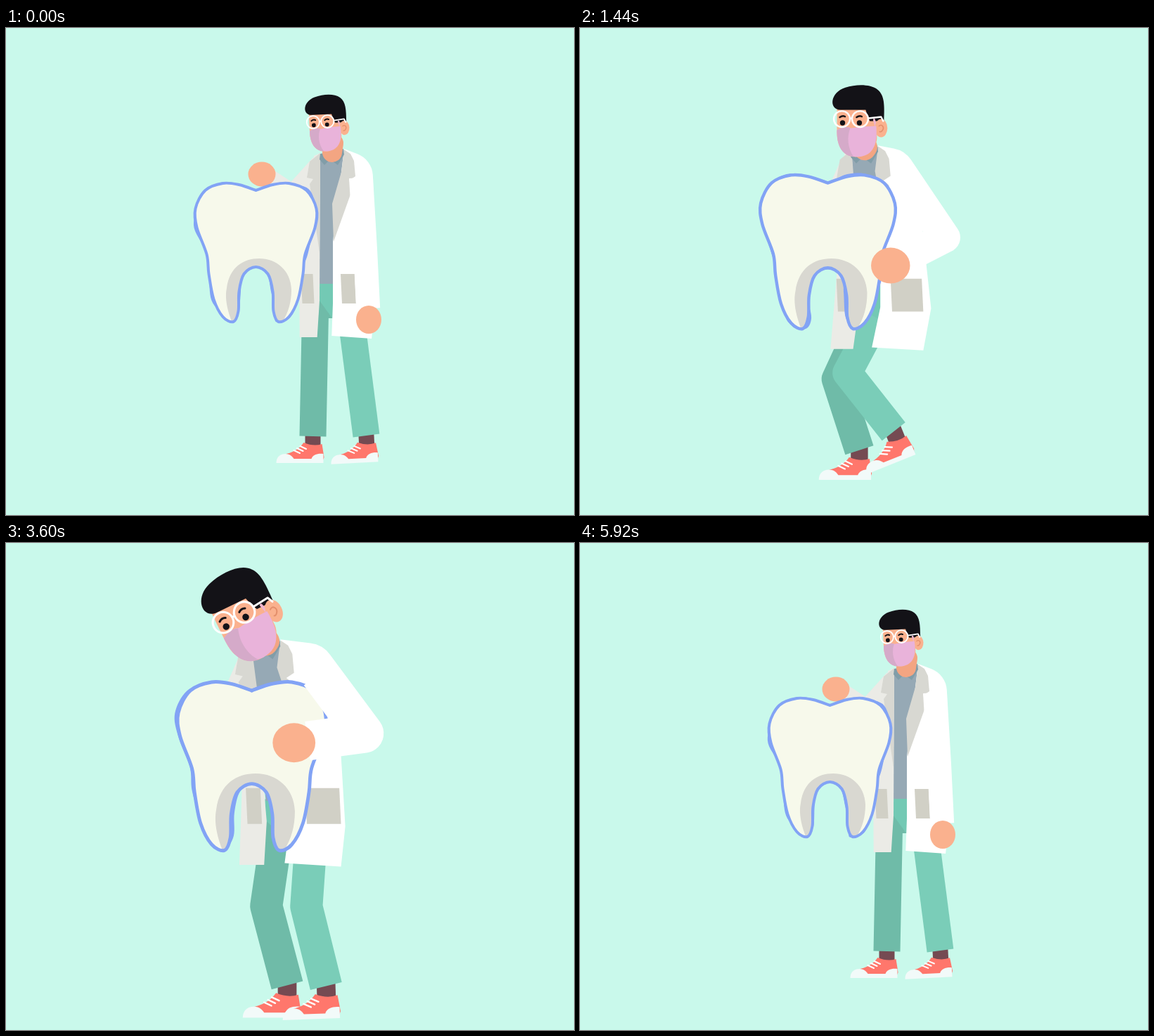
Write an HTML page with a canvas that moves like this. It is 808 px wide and 693 px high and loops after 6 s.

```html
<!DOCTYPE html>
<html lang="en">
<head>
<meta charset="utf-8">
<title>Dentist hugging a tooth</title>
<style>
html, body { margin: 0; width: 100%; height: 100%; overflow: hidden; background: #c9f9eb; }
canvas { display: block; }
</style>
</head>
<body>
<canvas id="stage" width="808" height="693"></canvas>
<script>
const ctx = document.getElementById('stage').getContext('2d');
const LOOP = 6000, STEP = 80, ZOOM_X = 383, ZOOM_Y = 328;
const BG = '#c9f9eb', SKIN = '#fab18e', WHITE = '#fff', BLACK = '#131217', BLUE = '#82a3f5';
const PALE = '#ebebe6', GREY = '#d8d8d2', POCKET = '#d1d0c6', DARK_GREEN = '#6fbba8';
const THIGH = 80, CALF = 96;

// Joints of the figure; near = size towards the viewer, turn and spread = how the coat opens
const stand = {
  neck: [464, 180], waist: [455, 364], hem: [453, 440],
  shoulder: [505, 213], elbow: [511, 315], hand: [516, 415], farHand: [364, 208],
  hipL: [440, 405], ankleL: [436.5, 581], hipR: [490, 405], ankleR: [512.5, 580],
  foot: -3, tilt: -3, near: 0, turn: 0, spread: 0, zoom: 1
};
const step = { ...stand,
  neck: [453, 180], waist: [451, 364], hem: [433, 440],
  shoulder: [496, 215], elbow: [505, 315], hand: [511, 410], farHand: [380, 262],
  hipL: [433, 405], ankleL: [398.5, 575], hipR: [487, 407], spread: 1, zoom: 1.003
};
const crouch = { ...step,
  neck: [403, 191], waist: [405, 362], hem: [400, 444],
  shoulder: [452, 221], elbow: [506, 301], hand: [436, 337],
  hipL: [400, 410], ankleL: [396, 574], hipR: [418, 404], ankleR: [440, 550],
  foot: -22, tilt: 0, near: .41, turn: 1, zoom: 1.109
};
const hug = { ...crouch,
  neck: [372, 179], waist: [382, 360], hem: [382, 435],
  shoulder: [435, 211], elbow: [487, 281], hand: [405, 292],
  hipL: [384, 404], ankleL: [397, 576], hipR: [425, 404], ankleR: [442.5, 577],
  foot: -2, tilt: -9.5, near: 1, zoom: 1.2
};
const hold = { ...hug, zoom: 1.215 };
const nod = { ...hold, tilt: -26 };
const back = { ...crouch, hand: [425, 323], foot: -39, tilt: -20, near: .6, zoom: 1.14 };
const KEYS = [[0, stand], [720, step], [1440, crouch], [2080, hug], [2500, hold], [3250, nod],
  [3850, nod], [4400, back], [5000, step], [5560, stand], [LOOP, stand]];

// Monotone cubic through the keys
function curve(get, t) {
  let i = 0;
  while (i < KEYS.length - 2 && t >= KEYS[i + 1][0]) i++;
  const val = k => get(KEYS[k][1]), span = k => KEYS[k + 1][0] - KEYS[k][0];
  const slope = k => (val(k + 1) - val(k)) / span(k);
  const tangent = k => {
    if (k === 0 || k === KEYS.length - 1) return 0;
    const a = slope(k - 1), b = slope(k);
    return a * b > 0 ? 2 * a * b / (a + b) : 0;
  };
  const u = (t - KEYS[i][0]) / span(i), v = 1 - u;
  return val(i) * v * v * (1 + 2 * u) + val(i + 1) * u * u * (3 - 2 * u)
    + span(i) * u * v * (v * tangent(i) - u * tangent(i + 1));
}
function poseAt(t) {
  const pose = {};
  for (const key in stand) {
    pose[key] = Array.isArray(stand[key])
      ? [0, 1].map(k => curve(p => p[key][k], t))
      : curve(p => p[key], t);
  }
  return pose;
}

const add = ([x, y], dx, dy) => [x + dx, y + dy];
// Several points given as offsets from one joint
function around(joint, ...offsets) {
  const points = [];
  for (let i = 0; i < offsets.length; i += 2) points.push(add(joint, offsets[i], offsets[i + 1]));
  return points;
}
// Point at a distance from a towards b, moved sideways by off
function toward(a, b, dist, off = 0) {
  const dx = b[0] - a[0], dy = b[1] - a[1], len = Math.hypot(dx, dy);
  return add(a, (dx * dist + dy * off) / len, (dy * dist - dx * off) / len);
}
function knee(hip, ankle) {
  const d = Math.hypot(ankle[0] - hip[0], ankle[1] - hip[1]);
  const along = (d * d + THIGH ** 2 - CALF ** 2) / (2 * d);
  return toward(hip, ankle, along, -Math.sqrt(Math.max(0, THIGH ** 2 - along ** 2)));
}

function fill(path, color) {
  ctx.fillStyle = color;
  ctx.fill(typeof path === 'string' ? new Path2D(path) : path);
}
function line(d, color, width) {
  ctx.strokeStyle = color;
  ctx.lineWidth = width;
  ctx.stroke(new Path2D(d));
}
function limb(points, color, width, cap = 'butt') {
  ctx.lineJoin = 'round';
  ctx.lineCap = cap;
  line('M' + points.join('L'), color, width);
}
const poly = (points, color) => fill('M' + points.join('L') + 'Z', color);
function oval([x, y], rx, ry, color) {
  ctx.fillStyle = color;
  ctx.beginPath();
  ctx.ellipse(x, y, rx, ry, 0, 0, 7);
  ctx.fill();
}
function at([x, y], angle, size, draw) {
  ctx.save();
  ctx.translate(x, y);
  ctx.rotate(angle * Math.PI / 180);
  ctx.scale(size, size);
  draw();
  ctx.restore();
}

// Origin at the ankle
function shoe() {
  ctx.lineCap = 'round';
  ctx.translate(15, 38);
  fill('M-26 -50H-4V-24H-26Z', '#754a52');
  fill('M-28 -29Q-14 -23 -2 -27L1 -8L-1 -3H-55L-56 -12C-45 -15 -36 -18 -28 -29Z', '#ff776c');
  fill('M-67 0C-67 -8 -62 -13 -54 -13C-47 -13 -44 -9 -42 -6H-17C-15 -12 -8 -14 0 -13V0Z', '#f2faf9');
  for (let i = 0; i < 3; i++) line(`M${-42 + 4.5 * i} ${-18 - 3 * i}l8.5 4`, WHITE, 2);
}
function leg(hip, ankle, angle, color) {
  at(ankle, angle, 1, shoe);
  limb([hip, knee(hip, ankle), ankle], color, 38);
}

// Origin at the top of the neck
function face() {
  ctx.translate(-22, -40);
  ctx.lineCap = ctx.lineJoin = 'round';
  fill('M-20 -16H30L37 0V28C36 42 20 56 5 54C-10 53 -20 40 -20 20Z', SKIN);
  fill('M-15 -13C-32 -14 -30 -38 -8 -45C8 -50 28 -50 38 -42C48 -34 48 -20 47 3H27L24 -3L21 -13Z', BLACK);
  line('M36 12L33 1', '#efb4cf', 3);
  oval([43, 13], 9, 13, SKIN);
  line('M40 10C44 6 48 12 45 16Q43 19 41 18', '#e48f6c', 1.6);
  fill('M-20 16Q-8 9 0 13Q18 10 36 10C38 32 34 53 10 54C-10 54 -20 42 -20 16Z', '#e9b3da');
  fill('M-20 16Q-8 9 -1 13C-6 25 -5 42 4 54C-12 52 -20 40 -20 16Z', '#d5aac9');
  for (const x of [-12, 12]) {
    oval([x, 5.5], 3.7, 3.7, BLACK);
    line(`M${x - 4} -2.5q4 -3 7.5 -1`, BLACK, 2.4);
  }
  line('M-1.5 0A11.5 11.5 0 1 0 -24.5 0A11.5 11.5 0 1 0 -1.5 0Q0 -2 1.5 0'
    + 'A11.5 11.5 0 1 0 24.5 0A11.5 11.5 0 1 0 1.5 0M24.5 -1L43 -3L46 3', WHITE, 2.4);
}

function coat({ neck, waist, hem, shoulder, elbow, turn, spread }, sleeve) {
  const half = 10 + 8 * turn, fit = .86 + .14 * spread;
  const pocket = (x, width) => poly(
    around(hem, x - width / 2 - 1, -90, x + width / 2 - 1, -90, x + width / 2 + 1, -48, x - width / 2 + 1, -48), POCKET);

  poly([...around(neck, -18, 0, 17, -6), ...around(waist, half, 0, -10, 0)], '#96a9b5');
  poly([...around(neck, -26, 2), ...around(waist, -38, -14),
    ...around(hem, -41 * fit, 0, -12 * fit, 0), ...around(waist, -9, 24), ...around(neck, -17, -2)], PALE);
  pocket(-24, 17);

  // The shoulder line runs tangent into the sleeve
  const start = add(neck, 17, -8), corner = toward(shoulder, elbow, -25, sleeve / 2);
  const front = new Path2D();
  front.moveTo(...start);
  front.arcTo(...corner, ...toward(shoulder, elbow, 40, sleeve / 2), 34);
  for (const p of [toward(shoulder, elbow, 0, sleeve / 2), add(waist, 70 + 13 * turn, 30),
    add(hem, 78 * fit, 2), add(hem, 12 * fit, -2), add(waist, half, 28), add(waist, half, -60)]) front.lineTo(...p);
  fill(front, WHITE);
  pocket(34 + 23 * spread, 20 + 20 * turn);

  poly([...around(neck, -17, -2, -32, 10, -36, 33, -27, 35, -32, 42), ...around(waist, -9, -44)], GREY);
  poly([...around(neck, 17, -7, 26, -1, 31, 9, 33, 31, 24, 37, 31, 43),
    ...around(waist, half + 1, -60, half - 1, -114), ...around(neck, 13, 25)], GREY);
  poly(around(neck, -17, -1, -18, 7, -11, 15, -3, 7, 8, 15, 17, 0, 16, -8), '#819da8');
}

// Right half of the tooth, from the top dent to the arch between the roots
const HALF = [[0, 231], [24, 223], [47, 221], [72, 231], [86, 257], [84, 284], [70, 322],
  [67, 350], [60, 386], [47, 411], [32, 418], [25, 403], [24, 375], [17, 350], [0, 340]];
const TOOTH = [...HALF, ...HALF.slice(0, -1).reverse().map(([x, y]) => [-x, y])]
  .map(([x, y]) => [355.5 + x, y]);

// Smooth open curve through points
function spline(p) {
  const path = new Path2D();
  path.moveTo(...p[0]);
  for (let i = 0; i < p.length - 1; i++) {
    const a = p[i - 1] || p[i], b = p[i], c = p[i + 1], d = p[i + 2] || c;
    path.bezierCurveTo(b[0] + (c[0] - a[0]) / 6, b[1] + (c[1] - a[1]) / 6,
      c[0] - (d[0] - b[0]) / 6, c[1] - (d[1] - b[1]) / 6, ...c);
  }
  return path;
}
function tooth(t) {
  const body = spline(TOOTH), phase = 2 * Math.PI * t / LOOP;
  const wobble = i => 4 * Math.sin(i * 2.4 + (1 + i % 3) * phase);
  fill(spline(TOOTH.map((p, i) => add(p, wobble(i), wobble(i + 7) / 2))), BLUE);
  fill(body, '#f7f9eb');
  ctx.save();
  ctx.clip(body);
  fill('M322 420C312 395 312 380 314 370C318 340 338 328 360 328C385 328 405 345 406 372C406 390 402 405 392 420Z', '#d9d8d1');
  ctx.restore();
  ctx.lineJoin = 'round';
  ctx.strokeStyle = BLUE;
  ctx.lineWidth = 4;
  ctx.stroke(body);
}

function draw(t) {
  const p = poseAt(t), sleeve = 34 + 12 * p.near;
  ctx.setTransform(1, 0, 0, 1, 0, 0);
  ctx.fillStyle = BG;
  ctx.fillRect(0, 0, 808, 693);
  ctx.translate(ZOOM_X, ZOOM_Y);
  ctx.scale(p.zoom, p.zoom);
  ctx.translate(-ZOOM_X, -ZOOM_Y);

  limb([add(p.neck, -17, 14), add(p.neck, -56 + 20 * p.turn, 57), p.farHand], PALE, 28);
  oval(p.farHand, 19.5, 17.5, SKIN);

  const half = 10 + 8 * p.turn;
  poly(around(p.waist, -11, -2, half, -2, half, 49, -11, 49), '#73c9b4');
  leg(p.hipL, p.ankleL, 0, DARK_GREEN);
  poly(around(p.waist, -9, 24, half - 1, 49, -11, 49), DARK_GREEN);
  leg(p.hipR, p.ankleR, p.foot, '#7acdb8');

  coat(p, sleeve);
  const nape = add(p.neck, 2, -16 + 10 * p.turn);
  limb([nape, add(p.neck, 0, -3)], '#f3a582', 28, 'round');
  at(nape, p.tilt, .787 + .273 * p.near, face);
  tooth(t);
  limb([p.shoulder, p.elbow, toward(p.hand, p.elbow, 16)], WHITE, sleeve);
  oval(p.hand, 18 + 7 * p.turn, 20 + 3 * p.turn, SKIN);
}

function tick() {
  draw(Math.floor(performance.now() % LOOP / STEP) * STEP);
  requestAnimationFrame(tick);
}
tick();
</script>
</body>
</html>
```
